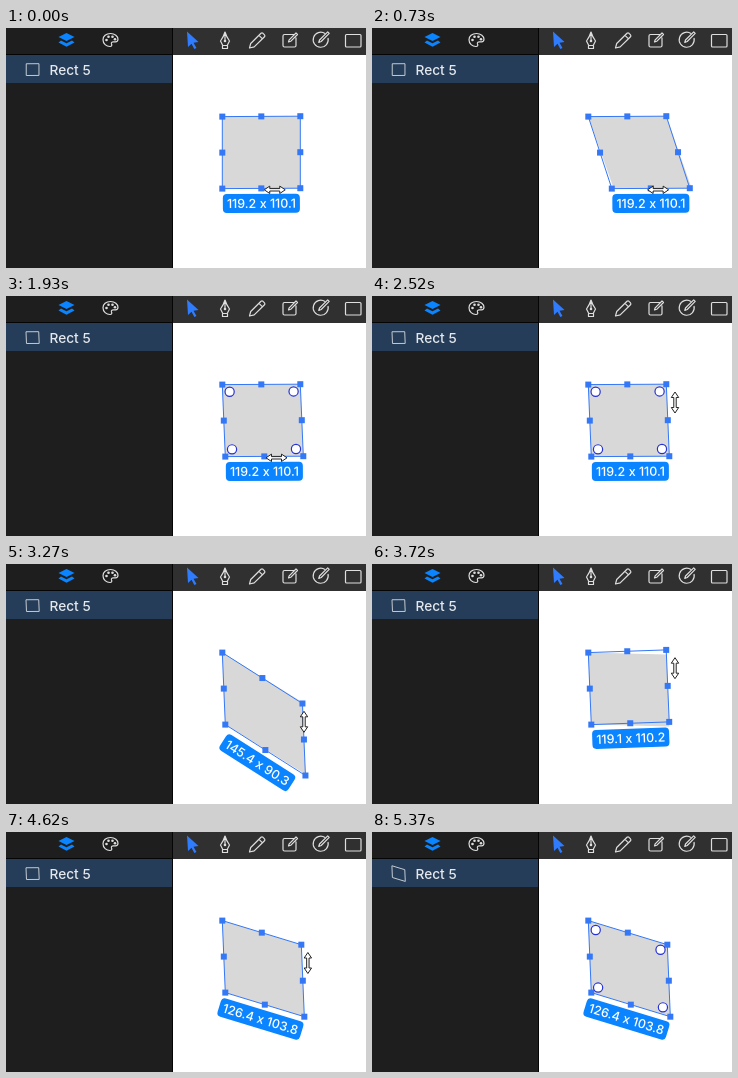
Recreate the animation shown at these times as an HTML page with a canvas. Size 360 px wide and 240 px high, loop 5.97 s.

```html
<!DOCTYPE html>
<html lang="en">
<head>
<meta charset="utf-8">
<title>Skewing a rectangle</title>
<style>
  html, body { margin: 0; width: 100%; height: 100%; overflow: hidden; background: #1e1e1e; }
  canvas { display: block; }
</style>
</head>
<body>
<canvas id="stage" width="360" height="240"></canvas>
<script>
const ctx = document.getElementById('stage').getContext('2d');
const LOOP = 5970;
const BLUE = '#0a84ff', OUTLINE = '#3478f6', FILL = '#d8d8d8', ICON = '#dedede';

// Skew per step of about 150 ms: first the bottom edge, then the right edge.
const SKEW_X = [0, 5, 16, 28, 31, 23.5, 4, -18, -37, -30, -13, -2, 2.5, 3];
const SKEW_Y = [0, 14, 46, 51.3, 42, 16, -2.3, -5, 2, 14, 24.5];
const RELEASE_X = 13, GRAB_Y = 20, RELEASE_Y = 33;
const POINTER = { 14: [282, 146], 15: [293, 128], 16: [303, 118], 34: [305, 164], 35: [306, 212] };

const toolIcons = [
  // palette
  'M104.500 5.500C100 5.500 97 8.200 97 11.800C97 15.800 100.300 18.500 104 18.500C106 18.500 106 17 105.500 16C105 14.700 106 13.800 107.300 13.800H109.500C111.300 13.800 112 13 112 11.300C112 8 108.800 5.500 104.500 5.500Z',
  // pen nib
  'M219 4Q217.500 9 214.500 13L216.800 17.500H221.200L223.500 13Q220.500 9 219 4ZM216.500 17.500V20.500H221.500V17.500M219 5V12',
  // pencil
  'M243.500 20L244.700 15.500L255 5.300Q256 4.500 257 5.300L258.500 6.800Q259.300 7.800 258.500 8.800L248.200 18.900ZM253 7.300L256.500 10.800',
  // square with pencil
  'M288 6.500H278.500Q277 6.500 277 8V17.500Q277 19 278.500 19H288.500Q290 19 290 17.500V9.500M282.500 14L283.200 11.800L290 5L291.500 6.500L284.700 13.300Z',
  // circle with pencil
  'M319 5.600A7.500 7.500 0 1 0 322 10M312.800 14.500L313.500 12L321.700 3.800L323.200 5.300L315.200 13.500Z',
  // rectangle
  'M340.500 6.500H354Q355 6.500 355 7.500V18Q355 19 354 19H340.500Q339.500 19 339.500 18V7.500Q339.500 6.500 340.500 6.500Z'
].map(d => new Path2D(d));
const layersIcon = new Path2D('M60.500 5L68.500 9L60.500 13L52.500 9ZM55 12.500L60.500 15.200L66 12.500L68.500 14.500L60.500 18.800L52.500 14.500Z');
const selectIcon = new Path2D('M181 3.500L192.500 14L187.500 14.700L190.500 20L188.300 21L185.500 15.800L182 19Z');
const pointerShape = new Path2D('M0 0L0 14L3.300 11L5.800 16.500L8 15.500L5.600 10.200L10 10Z');
const resizeShape = new Path2D('M-10.500 0L-5-3.700V-1.200H5V-3.700L10.500 0L5 3.700V1.200H-5V3.700Z');

const at = (list, i) => list[Math.max(0, Math.min(i, list.length - 1))];
const skewAt = i => [at(SKEW_X, i), at(SKEW_Y, i - GRAB_Y + 1)];

function rect(x, y, w, h, color) {
  ctx.fillStyle = color;
  ctx.fillRect(x, y, w, h);
}

function dot(x, y, r) {
  ctx.beginPath();
  ctx.arc(x, y, r, 0, Math.PI * 2);
}

// Maps unit coordinates onto the skewed rectangle.
function parallelogram([dx, dy]) {
  const ux = 78 + dx / 72 * dy, uy = dy - 0.4;
  return (a, b) => [216.3 + a * ux + b * dx, 88.6 + a * uy + b * 72];
}

function trace(map) {
  ctx.beginPath();
  for (const [a, b] of [[0, 0], [1, 0], [1, 1], [0, 1]]) ctx.lineTo(...map(a, b));
  ctx.closePath();
}

function drawChrome(committed) {
  rect(0, 0, 360, 240, '#1e1e1e');
  rect(167, 0, 193, 27, '#303030');
  rect(167, 27, 193, 213, '#fff');
  rect(0, 27, 166, 28, '#253d59');
  rect(0, 26, 166, 1, '#050505');
  rect(166, 0, 1, 240, '#050505');

  ctx.fillStyle = BLUE;
  ctx.fill(layersIcon);
  ctx.fillStyle = '#2f7cff';
  ctx.fill(selectIcon);
  ctx.strokeStyle = ICON;
  ctx.lineWidth = 1.2;
  ctx.lineJoin = 'round';
  toolIcons.forEach(icon => ctx.stroke(icon));
  ctx.fillStyle = ICON;
  for (const [x, y] of [[100.5, 12], [102.5, 8.8], [106.5, 8.8], [109, 11.2], [219, 13]]) {
    dot(x, y, 1.3);
    ctx.fill();
  }

  // The layer thumbnail repeats the shape as it was last released.
  const map = parallelogram(committed), [mx, my] = map(0.5, 0.5), scale = 0.163;
  trace((a, b) => {
    const [x, y] = map(a, b);
    return [26.6 + (x - mx) * scale, 41.6 + (y - my) * scale];
  });
  ctx.strokeStyle = '#c3cad2';
  ctx.lineWidth = 1;
  ctx.stroke();

  ctx.font = '500 13.7px Inter, sans-serif';
  ctx.textAlign = 'left';
  ctx.textBaseline = 'alphabetic';
  ctx.fillStyle = '#e4e8ed';
  ctx.fillText('Rect 5', 43.5, 46.5);
}

function drawLabel(map, [dx, dy]) {
  const width = Math.hypot(78 + dx / 72 * dy, dy) * 119.2 / 78;
  const height = 119.2 * 110.1 / width;
  const text = `${width.toFixed(1)} x ${height.toFixed(1)}`;
  const [x, y] = map(0.5, 1);
  ctx.save();
  ctx.translate(x, y);
  ctx.rotate(Math.atan2(dy - 0.4, 78 + dx / 72 * dy));
  ctx.font = '500 12.5px Inter, sans-serif';
  ctx.textAlign = 'center';
  const w = ctx.measureText(text).width + 8;
  ctx.fillStyle = BLUE;
  ctx.beginPath();
  ctx.roundRect(-w / 2, 5.5, w, 19, 4);
  ctx.fill();
  ctx.fillStyle = '#fff';
  ctx.fillText(text, 0, 19.5);
  ctx.restore();
}

function drawShape(i, skew) {
  const map = parallelogram(skew), before = skewAt(i - 1);
  // The fill trails slightly behind the outline.
  trace(parallelogram(skew.map((v, k) => v + 0.25 * (before[k] - v))));
  ctx.fillStyle = FILL;
  ctx.fill();
  trace(map);
  ctx.strokeStyle = OUTLINE;
  ctx.lineWidth = 1;
  ctx.stroke();

  for (const a of [0, 0.5, 1]) for (const b of [0, 0.5, 1]) {
    if (a === 0.5 && b === 0.5) continue;
    const [x, y] = map(a, b);
    rect(x - 3, y - 3, 6, 6, OUTLINE);
  }
  drawLabel(map, skew);

  if (i >= RELEASE_X && i < GRAB_Y || i >= RELEASE_Y) {
    ctx.fillStyle = '#fff';
    ctx.strokeStyle = '#2430d8';
    ctx.lineWidth = 1.2;
    for (const a of [0.09, 0.91]) for (const b of [0.1, 0.9]) {
      dot(...map(a, b), 4.6);
      ctx.fill();
      ctx.stroke();
    }
  }
}

function drawCursor(i, [dx, dy]) {
  if (i > 35) return;
  const pointer = POINTER[i];
  ctx.save();
  ctx.lineWidth = 1;
  if (pointer) {
    ctx.translate(...pointer);
    ctx.fillStyle = '#000';
    ctx.strokeStyle = '#fff';
  } else {
    if (i <= RELEASE_X) {
      const lead = 0.25 * (at(SKEW_X, i + 1) - dx);
      ctx.translate(255 + dx + 12.5 + lead, 161.8);
    } else {
      ctx.translate(303 - dy * dy * 0.0019, 106.5 + dy);
      ctx.rotate(Math.PI / 2);
    }
    ctx.fillStyle = '#fff';
    ctx.strokeStyle = '#222';
  }
  const shape = pointer ? pointerShape : resizeShape;
  ctx.fill(shape);
  ctx.stroke(shape);
  ctx.restore();
}

function draw(t) {
  const drift = t < 300 ? 0 : t < 2500 ? 20 : 30;
  const i = Math.floor((t + drift) / 150);
  const skew = skewAt(i);
  drawChrome(i < RELEASE_X ? [0, 0] : i < RELEASE_Y ? [3, 0] : skew);
  drawShape(i, skew);
  drawCursor(i, skew);
}

const start = performance.now();
function tick() {
  draw((performance.now() - start) % LOOP);
  requestAnimationFrame(tick);
}
tick();
</script>
</body>
</html>
```
